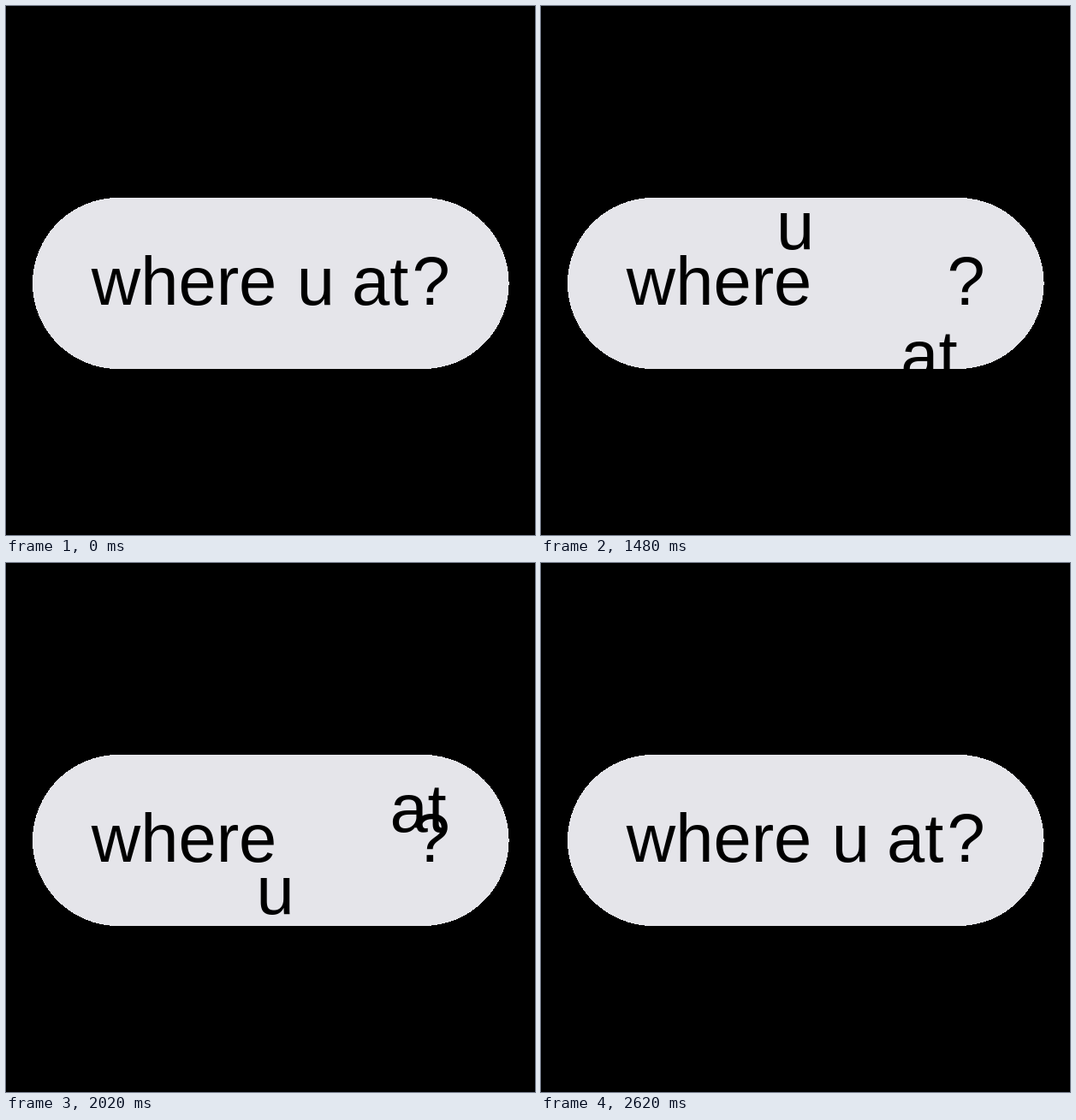
An HTML page for the animation above (2680 ms loop, 618x618 px).

```html
<!DOCTYPE html>
<html lang="en">
<head>
<meta charset="utf-8">
<title>where u at?</title>
<style>
  html, body { margin: 0; width: 100%; height: 100%; overflow: hidden; background: #000; }
  svg { display: block; width: 100vw; height: 100vh; }
  text { font: 79.5px "Liberation Sans", Arial, sans-serif; fill: #000; }
</style>
</head>
<body>
<svg viewBox="0 0 618 618">
  <rect x="31" y="224" width="556.6" height="200" rx="100" fill="#e5e5ea" shape-rendering="crispEdges"/>
  <text x="99.8" y="349">where</text>
  <text x="474.6" y="349">?</text>
  <text id="u" x="339.8" y="349.3">u</text>
  <text id="at" x="404" y="349">at</text>
</svg>
<script>
  const LOOP = 2680, HOLD = 1000, STEP = 60;
  const keyTimes = [1008, 1548, 2086, 2620];

  // Offsets from the resting place at each key time.
  const movers = [
    { el: document.getElementById('u'), path: [[0, 0], [-71.5, -71.5], [-45, 74], [0, 0]] },
    { el: document.getElementById('at'), path: [[0, 0], [18, 95], [47, -47.5], [0, 0]] }
  ];

  const ease = t => t - 0.3 * Math.sin(2 * Math.PI * t) / (2 * Math.PI);
  const mix = (a, b, p) => a + (b - a) * p;

  function draw(time) {
    const t = time < HOLD ? 0 : HOLD + Math.floor((time - HOLD) / STEP) * STEP;
    const i = t < keyTimes[1] ? 0 : t < keyTimes[2] ? 1 : 2;
    const span = keyTimes[i + 1] - keyTimes[i];
    const p = ease(Math.min(1, Math.max(0, (t - keyTimes[i]) / span)));
    for (const { el, path } of movers) {
      const [x, y] = path[i].map((from, axis) => mix(from, path[i + 1][axis], p));
      el.setAttribute('transform', `translate(${x.toFixed(2)} ${y.toFixed(2)})`);
    }
  }

  const start = performance.now();
  function tick() {
    draw((performance.now() - start) % LOOP);
    requestAnimationFrame(tick);
  }
  tick();
</script>
</body>
</html>
```
